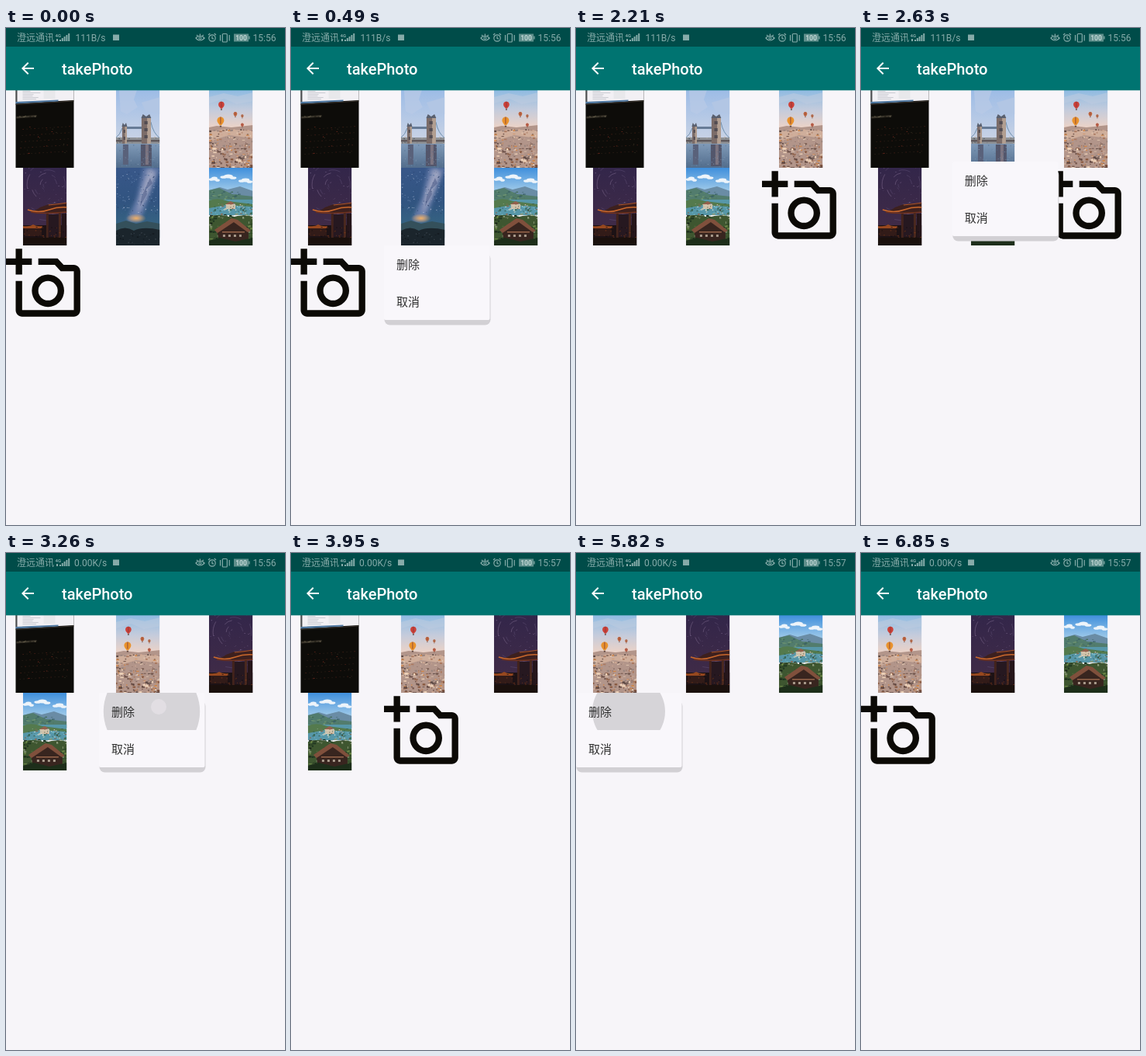
An HTML page that plays this animation: 360x640 px, repeating every 6920 ms.

```html
<!DOCTYPE html>
<html lang="zh">
<head>
<meta charset="utf-8">
<title>takePhoto</title>
<style>
html, body { margin: 0; width: 100%; height: 100%; overflow: hidden; background: #f7f5f9; }
svg { display: block; width: 360px; height: 640px; }
.status { font: 12px Roboto, "Noto Sans CJK SC", sans-serif; fill: #86aba9; }
.cjk { font-family: "Noto Sans CJK SC", "Noto Sans CJK", sans-serif; }
.line { fill: none; stroke: #86aba9; }
</style>
</head>
<body>
<svg viewBox="0 0 360 640">
  <defs>
    <clipPath id="frame"><rect width="56.25" height="100"/></clipPath>
    <clipPath id="item"><rect width="136.500" height="48" rx="2"/></clipPath>
    <linearGradient id="daySky" x2="0" y2="1"><stop stop-color="#9dbce6"/><stop offset="1" stop-color="#cdd5e5"/></linearGradient>
    <linearGradient id="river" x2="0" y2="1"><stop stop-color="#809ab8"/><stop offset="1" stop-color="#526d8c"/></linearGradient>
    <linearGradient id="dawn" x2="0" y2="1"><stop stop-color="#8fbbe2"/><stop offset=".5" stop-color="#c3cbdc"/><stop offset="1" stop-color="#efd3c5"/></linearGradient>
    <linearGradient id="dusk" x2="0" y2="1"><stop stop-color="#33264a"/><stop offset="1" stop-color="#432c46"/></linearGradient>
    <linearGradient id="night" x2="0" y2="1"><stop stop-color="#385789"/><stop offset=".5" stop-color="#315480"/><stop offset="1" stop-color="#386c83"/></linearGradient>
    <radialGradient id="glow"><stop stop-color="#efb068"/><stop offset="1" stop-color="#efb068" stop-opacity="0"/></radialGradient>
    <linearGradient id="summer" x2="0" y2="1"><stop stop-color="#3f8fdc"/><stop offset="1" stop-color="#b3d6ec"/></linearGradient>
    <filter id="soft"><feGaussianBlur stdDeviation="2.5"/></filter>
  </defs>
  <rect width="360" height="640" fill="#f7f5f9"/>
  <g id="photos"></g>
  <path id="camera" fill="#0c0a06" fill-rule="evenodd" d="M5 9V6h3V4H5V1H3v3H0v2h3v3zM21 6h-3.17L16 4h-6v2h5.12l1.83 2H21v12H5V11H3v9c0 1.1.9 2 2 2h16c1.1 0 2-.9 2-2V8c0-1.1-.9-2-2-2zM8 14a5 5 0 0 0 10 0a5 5 0 0 0-10 0zm2 0a3 3 0 0 1 6 0a3 3 0 0 1-6 0z"/>

  <rect width="360" height="24" fill="#004c49"/>
  <rect y="24" width="360" height="56.300" fill="#007471"/>
  <path transform="translate(16 40)" fill="#fff" d="M20 11H7.83l5.59-5.59L12 4l-8 8 8 8 1.41-1.41L7.83 13H20z"/>
  <text x="72" y="59.800" fill="#fff" font-family="Roboto, sans-serif" font-size="20" font-weight="500">takePhoto</text>
  <g class="status">
    <text class="cjk" x="14" y="17">澄远通讯</text>
    <text x="63.5" y="11.5" font-size="6" font-weight="700">4G</text>
    <path d="M65 14h2v3h-2zM69 15h2v2h-2zM71.8 13h2v4h-2zM74.6 11h2v6h-2zM77.4 9h2v8h-2zM80.2 7h2v10h-2z"/>
    <text id="speed" y="17"></text>
    <rect x="138" y="8.5" width="8" height="7.5"/>
    <g class="line" stroke-width="1.2">
      <path d="M244.700 13q5.700-6 11.400 0q-5.700 6-11.400 0M246 9l1.500 1.500M250.400 7.500v2M254.800 9l-1.500 1.500"/>
      <circle cx="250.400" cy="13" r="1.500"/>
      <circle cx="266" cy="13" r="4.200"/>
      <path d="M266 10.500v2.800l2 1M261 9l2.300-2M271 9l-2.300-2"/>
      <rect x="279.300" y="7.500" width="6" height="10.500" rx="1"/>
      <path d="M276.500 9v7.500M288.200 9v7.500"/>
    </g>
    <path fill="#5f8f8c" d="M294 7.500h19v3h1.800v4H313v3h-19z"/>
    <text x="303.500" y="15.800" font-size="8.500" font-weight="700" text-anchor="middle" style="fill:#c3d8d6">100</text>
    <text id="clock" x="318.500" y="17"></text>
  </g>

  <g id="menu">
    <rect x=".5" y="10" width="137" height="92.500" rx="7" fill="#d2d0d4"/>
    <rect width="136.500" height="96" rx="2" fill="#f9f7fb"/>
    <g clip-path="url(#item)"><circle id="ripple" cx="68" cy="24" fill="#d6d4d8"/></g>
    <g class="cjk" font-size="15" fill="#303030">
      <text x="16" y="29.600">删除</text>
      <text x="16" y="77.600">取消</text>
    </g>
  </g>
  <circle id="touch" cx="197" cy="198" r="10" fill="#e8e3ea" fill-opacity=".65"/>
</svg>
<script>
const el = id => document.getElementById(id);
const LOOP = 6920;

let seed = 7;
const rnd = (a, b) => a + (b - a) * ((seed = (seed * 16807) % 2147483647) / 2147483647);
const rect = (x, y, w, h, fill) => `<rect x="${x}" y="${y}" width="${w}" height="${h}" fill="${fill}"/>`;
const shape = (d, fill, more = '') => `<path d="${d}" fill="${fill}" ${more}/>`;
const stroke = (d, color, width, more = '') => shape(d, 'none', `stroke="${color}" stroke-width="${width}" ${more}`);
const disc = (x, y, r, fill) => `<circle cx="${x}" cy="${y}" r="${r}" fill="${fill}"/>`;
const repeat = (n, make) => Array.from({ length: n }, (_, i) => make(i)).join('');
// Scatters small patches of the given colours over a box.
const specks = (n, x, y, w, h, colors, size = 1.5) => repeat(n, i =>
  rect(rnd(x, x + w).toFixed(1), rnd(y, y + h).toFixed(1), rnd(.5, size * 1.6).toFixed(1), rnd(.5, size).toFixed(1), colors[i % colors.length]));

function laptop() {
  return rect(0, 0, 75, 100, '#0d0c09') +
    shape('M0 0H75V13L0 17z', '#f2f0f4') +
    shape('M0 0H2V15H0z', '#4b4c4e') +
    repeat(6, i => rect(9, 1 + i * 2, rnd(10, 24), .7, '#b9bcc4')) +
    rect(36, 0, 15, 11, '#e8e8eb') +
    shape('M0 15L55 12.500V14.500L0 17.500z', '#527aa2') +
    stroke('M0 18.500L75 14', '#3b352f', 1) +
    shape('M1 34L27 32V34.500L1 36.500z', '#39342a') +
    specks(12, 2, 32.500, 24, 2, ['#8d826a', '#211f17'], .9) +
    repeat(5, r => repeat(13, c => rect(9 + c * 5 - r, 50 + r * 8 - c * .3, 1.300, .8, (r + c) % 3 ? '#302119' : '#57251b'))) +
    specks(12, 8, 44, 62, 40, ['#7c2b1e', '#47402e'], 1);
}

function bridge() {
  // A tower with a pointed roof, paler on its lit side.
  const tower = (x, top, w) => rect(x, top, w, 70 - top, '#7b6c69') +
    rect(x + w * .6, top, w * .4, 70 - top, '#b29f91') +
    repeat(3, i => rect(x + w * .3, top + 4 + i * 9, w * .35, 4, '#514c53')) +
    shape(`M${x - .5} ${top}L${x + w * .15} ${top - 5}L${x + w * .5} ${top - 2}L${x + w * .85} ${top - 5}L${x + w + .5} ${top}z`, '#59606f');
  return rect(0, 0, 57, 70, 'url(#daySky)') +
    shape('M4 0H27L23 12L28 22L14 31L6 27z', '#b9cbe7', 'opacity=".7"') +
    shape('M33 16L57 9V31L38 27z', '#b2c6e4') +
    rect(0, 61, 57, 8, '#8f9296') +
    specks(35, 0, 60, 55, 8, ['#646e75', '#b9aea5', '#525d69']) +
    rect(14, 47, 20, 3, '#667b96') +
    stroke('M0 61Q5 58 8 49M45 41Q48 56 57 62', '#6f8fad', 1) +
    rect(0, 64, 57, 2.500, '#5f595c') +
    tower(8, 47, 6) + tower(33, 36, 12) +
    rect(0, 69, 57, 31, 'url(#river)') +
    rect(9, 70, 7, 26, '#59617a') + rect(32, 70, 14, 28, '#53566b') + rect(38, 70, 4, 26, '#7c7480') +
    specks(65, 0, 70, 56, 29, ['#708aa9', '#506b8a', '#8199b1'], .9);
}

function balloons() {
  const balloon = (x, y, r, color) => disc(x, y, r, color) +
    shape(`M${x - r * .8} ${y + r * .6}H${x + r * .8}L${x + r * .25} ${y + r * 1.400}H${x - r * .25}z`, color) +
    rect(x - r * .25, y + r * 1.500, r * .5, r * .4, '#664b43') +
    stroke(`M${x} ${y - r}V${y + r}`, '#7e3a3b', r * .18);
  return rect(0, 0, 57, 50, 'url(#dawn)') +
    shape('M0 9L19 4L37 8L57 3V14L36 18L20 11L0 17z', '#bdcde0', 'opacity=".55"') +
    shape('M0 48L10 46L29 48L57 45V100H0z', '#b2958a') +
    shape('M0 54L20 50L57 53V62L26 58L0 66z', '#cfae9b') +
    specks(210, 0, 50, 56, 49, ['#e2c7b0', '#77594f', '#a9785f', '#cfa993', '#5f4b46', '#cf8549', '#98847e'], 2.300) +
    specks(60, 0, 74, 56, 26, ['#634840', '#efd3ba', '#8a5b43'], 3) +
    balloon(16, 18.500, 3.800, '#cc4038') + balloon(15, 39, 4.500, '#e9922c') +
    balloon(34, 30.500, 2.400, '#c0673f') + balloon(43, 33, 1.800, '#b8704e') + balloon(43, 44.500, 2, '#bd6349');
}

function temple() {
  const trails = repeat(26, i => {
    const r = 4 + i * 1.900, a = rnd(0, 6.280), b = a + rnd(.3, .8);
    const at = t => `${(32 + r * Math.cos(t)).toFixed(1)} ${(22 + r * Math.sin(t)).toFixed(1)}`;
    return stroke(`M${at(a)}A${r} ${r} 0 0 1 ${at(b)}`, i % 3 ? '#66557c' : '#8d789a', .45);
  });
  return rect(0, 0, 57, 100, 'url(#dusk)') + trails + specks(28, 0, 0, 56, 45, ['#7e6990', '#4d3c61'], .8) +
    shape('M0 74H57V100H0z', '#1c1215') +
    shape('M22 51L33 47L57 45V58L34 58L8 56Q18 55 22 51z', '#3d201e') +
    stroke('M6 54Q20 59 34 54Q45 50 57 51', '#c9682c', 1.500) +
    stroke('M33 48Q44 47 57 45', '#a9532a', 1.200) +
    stroke('M10 57Q28 60 57 57', '#6f321e', 1.500) +
    rect(30, 59, 3, 31, '#42231c') + rect(46, 58, 3, 32, '#4a281e') +
    rect(33, 60, 13, 29, '#261820') + rect(50, 59, 7, 31, '#25151a') +
    shape('M0 75Q9 76 13 73Q18 76 25 75L24 78H0z', '#97481f') +
    rect(2, 78, 22, 10, '#321b18') +
    specks(34, 1, 76, 54, 14, ['#733619', '#120c10', '#49251a']) +
    rect(0, 90, 57, 10, '#1a100d');
}

function galaxy() {
  return rect(0, 0, 57, 90, 'url(#night)') +
    `<g filter="url(#soft)">${shape('M36 0H57L43 36L31 69H14L27 38z', '#667ca9')}${shape('M43 0L51 8L39 38L27 62L32 34z', '#9ba3c0')}</g>` +
    shape('M44 13L47 20L39 28L40 34L31 50L33 37z', '#50608a', 'opacity=".6"') +
    specks(130, 0, 0, 56, 60, ['#6b8bb4', '#a8b5cf', '#283f68', '#48699a'], 1) +
    '<ellipse cx="26" cy="65" rx="13" ry="6" fill="url(#glow)"/>' +
    shape('M0 72L13 68L26 72L40 69L57 72V100H0z', '#34505b') +
    shape('M0 81Q12 74 23 81Q35 75 57 80V100H0z', '#1b252c') +
    specks(36, 0, 83, 56, 15, ['#38424b', '#11171d'], 1.500);
}

function lake() {
  const cloud = (x, y, s) => `<g fill="#edf4fa">${[[0, 0, 3], [4, -1, 4], [8, 1, 3]].map(([a, b, r]) => `<ellipse cx="${x + a * s}" cy="${y + b}" rx="${r * s}" ry="${r * .6}"/>`).join('')}</g>`;
  return rect(0, 0, 57, 36, 'url(#summer)') + cloud(3, 15, 1) + cloud(19, 12, 1.500) + cloud(42, 17, 1.300) +
    shape('M0 29L14 25L24 28L40 24L57 30V45H0z', '#6a8ca5') +
    shape('M0 29L13 26L30 34L57 37V46H0z', '#527c6d') +
    specks(35, 0, 30, 40, 11, ['#416a55', '#6c9270', '#3c6267'], 2) +
    rect(0, 41, 57, 20, '#5797a9') +
    shape('M0 42Q12 38 25 43L57 47V50L22 48L0 52z', '#547a4d') +
    rect(22, 47, 12, 6, '#d4c3ab') + shape('M21 47L28 43L35 47z', '#94604d') +
    specks(95, 0, 46, 56, 18, ['#e1e5d8', '#386d56', '#72b5c3', '#8a6850', '#31523d', '#b8bfb0'], 2) +
    shape('M0 63Q14 58 29 64Q43 59 57 63V100H0z', '#3e5630') +
    specks(120, 0, 59, 56, 40, ['#1c3220', '#6f8a48', '#2e4727', '#172517', '#8f9c7c'], 2.800) +
    shape('M10 79L30 66L51 79V95H13z', '#38251f') +
    shape('M7 80L29 65L37 67L54 81L50 83L32 70L11 84z', '#80503c') +
    rect(17, 82, 29, 1.500, '#95644a') + repeat(4, i => rect(18 + i * 7, 86, 3, 3, '#a8998a')) +
    shape('M0 94L14 90L34 95L57 90V100H0z', '#1d2e1a');
}

const art = { laptop, bridge, balloons, temple, galaxy, lake };
el('photos').innerHTML = Object.entries(art).map(([name, draw]) =>
  `<g id="${name}" ${name === 'laptop' ? '' : 'clip-path="url(#frame)"'}>${draw()}</g>`).join('');

const removals = [
  { name: 'galaxy', x: 120, y: 280, open: 280, press: 750 },
  { name: 'bridge', x: 120, y: 180, open: 2560, press: 3150 },
  { name: 'laptop', x: 0, y: 180, open: 5120, press: 5750 }
];
const removeDelay = 70, fadeDelay = 210, fadeTime = 140;
const names = Object.keys(art);
const clamp = v => Math.max(0, Math.min(1, v));
const slot = i => [i % 3 * 120, 80 + Math.floor(i / 3) * 100];
const move = (node, x, y, more = '') => node.setAttribute('transform', `translate(${x} ${y})${more}`);

function render(t) {
  const gone = removals.filter(r => t >= r.press + removeDelay).map(r => r.name);
  const shown = names.filter(n => !gone.includes(n));
  names.forEach(n => { el(n).style.display = gone.includes(n) ? 'none' : ''; });
  shown.forEach((n, i) => {
    const [x, y] = slot(i);
    move(el(n), x + (n === 'laptop' ? 12.5 : 21.9), y);
  });
  move(el('camera'), ...slot(shown.length), ' scale(4.1667)');

  const active = removals.find(r => t >= r.open && t < r.press + fadeDelay + fadeTime);
  el('menu').style.display = active ? '' : 'none';
  if (active) {
    const age = t - active.open, held = t - active.press;
    const left = (1 - clamp(age / 210)) ** 2;
    move(el('menu'), active.x - 5 * left, active.y - 18 * left);
    el('menu').style.opacity = Math.min(clamp(.3 + age / 100), 1 - clamp((held - fadeDelay) / fadeTime));
    el('ripple').setAttribute('r', held < 0 ? 0 : Math.min(80, 20 + held * .38));
  }
  el('touch').style.display = t >= 3120 && t < 3330 ? '' : 'none';
  const slow = t >= 2770;
  el('speed').textContent = slow ? '0.00K/s' : '111B/s';
  el('speed').setAttribute('x', slow ? 88 : 89.5);
  el('clock').textContent = t < 3950 ? '15:56' : '15:57';
}

const start = performance.now();
function tick() {
  render((performance.now() - start) % LOOP);
  requestAnimationFrame(tick);
}
render(0);
requestAnimationFrame(tick);
</script>
</body>
</html>
```
